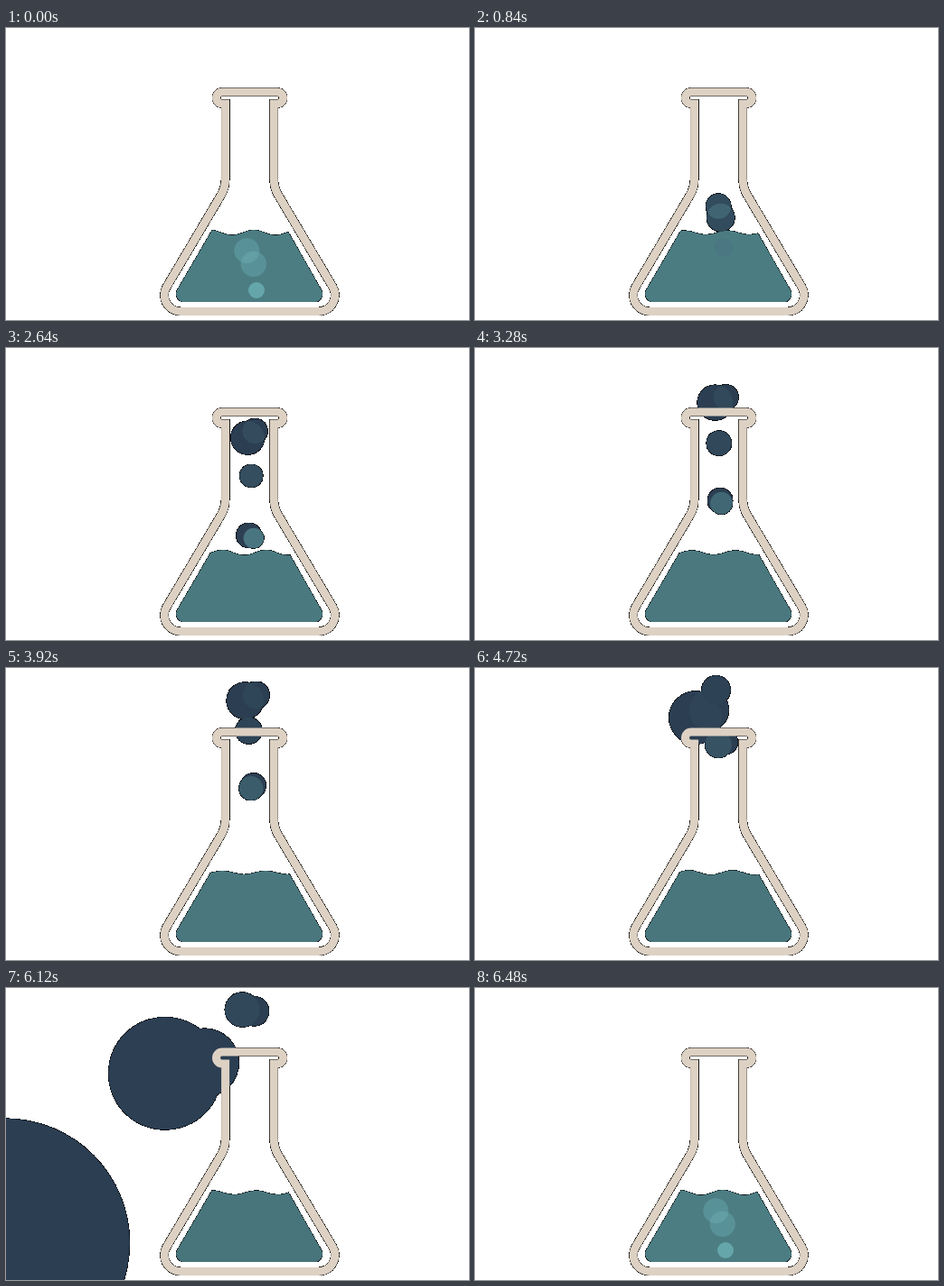
Animation, 512 px wide and 324 px high, one loop 6.52 s. Source, as an HTML page with a canvas:

```html
<!DOCTYPE html>
<html lang="en">
<head>
<meta charset="utf-8">
<title>Bubbling flask</title>
<style>
  html, body { margin: 0; width: 100%; height: 100%; overflow: hidden; background: #fff; }
  canvas { display: block; width: 512px; height: 324px; }
</style>
</head>
<body>
<canvas id="stage" width="512" height="324"></canvas>
<script>
const W = 512, H = 324, LOOP = 6520, RESET = 6480, STEP = 40;
const ctx = document.getElementById('stage').getContext('2d', { willReadFrequently: true });

const NAVY = [43, 62, 82], PALE = [100, 166, 170];
const TEAL = [76, 125, 131], TEAL_END = [72, 115, 122];

// Ways to drift off after leaving the neck: shift after one second, and its power.
const swell = { dx: -18.3, dy: 17, dr: 8.1, power: 3 };
const slide = { dx: -21, dy: 19.5, dr: 8.5, power: 1.2 };
const sweep = { dx: -52, dy: 43, dr: 26.6, power: 2 };

// Rates (rise, lean, grow) are pixels per second; times are milliseconds.
const lead = { born: -100, x: 274, y: 268, r: 14, rise: 61.4, lean: -2.5, grow: 1.7, turn: 3780, fade: 450, drift: swell };
const twin = { born: -100, x: 266, y: 253, r: 14, rise: 58.7, lean: 3.4, grow: 0, turn: 3840, fade: 450, drift: slide };
const third = { born: 0, x: 277, y: 291, r: 9, rise: 56.5, lean: -2.2, grow: 1.5, turn: 4800, fade: 1400, drift: sweep };
const fourth = { born: 1300, x: 277, y: 292, r: 9, rise: 60.5, lean: -2.3, grow: 1.7, turn: 4500, fade: 2100, drift: sweep };
const rear = { born: 1350, x: 263.5, y: 286, r: 14, rise: 60.5, lean: 3.9, grow: 0, turn: 4400, fade: 300, drift: slide };

const mix = (a, b, k) => a.map((v, i) => v + (b[i] - v) * k);
const rgb = c => `rgb(${c.map(Math.round)})`;

function disc(b, t) {
  const age = t - b.born;
  const up = Math.min(age, b.turn) / 1000;
  const off = Math.pow(Math.max(0, age - b.turn) / 1000, b.drift.power);
  ctx.beginPath();
  ctx.arc(b.x + b.lean * up + b.drift.dx * off,
    b.y - b.rise * up + b.drift.dy * off,
    b.r + b.grow * up + b.drift.dr * off, 0, Math.PI * 2);
}

function drawBubble(b, t) {
  if (t < b.born) return;
  disc(b, t);
  ctx.fillStyle = rgb(mix(NAVY, PALE, Math.exp((b.born - t) / b.fade)));
  ctx.fill();
}

function drawOverlap(a, b, t) {
  ctx.save();
  disc(a, t);
  ctx.clip();
  disc(b, t);
  ctx.fillStyle = `rgba(120,190,190,${.3 * Math.exp(-t / 2500)})`;
  ctx.fill();
  ctx.restore();
}

function drawLiquid(t) {
  const crest = 274 + 14 * Math.sin(Math.PI * t / RESET);
  const height = 2.4 + .5 * Math.cos(2 * Math.PI * t / 2640);
  const bottom = 304.1;
  ctx.save();
  ctx.beginPath();
  ctx.moveTo(269, bottom);
  ctx.arcTo(181.5, bottom, 231, 219, 9);
  ctx.lineTo(231, 219);
  ctx.lineTo(308, 219);
  ctx.arcTo(356.5, bottom, 269, bottom, 9);
  ctx.closePath();
  ctx.clip();
  ctx.beginPath();
  ctx.moveTo(180, 306);
  for (let x = 180; x <= 360; x += 2)
    ctx.lineTo(x, 227 - height * Math.cos((x - crest) * Math.PI / 24));
  ctx.lineTo(360, 306);
  ctx.fillStyle = rgb(mix(TEAL, TEAL_END, t / RESET));
  ctx.fill();
  ctx.restore();
}

const flask = new Path2D(
  'M242.6 84 V167 Q242.6 177 238 185 L177.6 287.2 A18.2 18.2 0 0 0 193.3 314.5' +
  ' H345.5 A18.2 18.2 0 0 0 361.3 287.2 L300.8 185 Q296.2 177 296.2 167 V84' +
  ' H300 A6.5 6.5 0 0 0 300 71 H239 A6.5 6.5 0 0 0 239 84 Z');

function drawFlask() {
  ctx.lineWidth = 9;
  ctx.strokeStyle = '#ddd1c3';
  ctx.stroke(flask);
}

// Soft edge pixels are blended with black, which gives the thin dark outline.
function hardenEdges() {
  const image = ctx.getImageData(0, 0, W, H), d = image.data;
  for (let i = 0; i < d.length; i += 4) {
    const alpha = d[i + 3];
    if (alpha === 0 || alpha === 255) continue;
    for (let c = i; c < i + 3; c++) d[c] *= alpha / 255;
    d[i + 3] = 255;
  }
  ctx.putImageData(image, 0, 0);
}

function draw(t) {
  ctx.clearRect(0, 0, W, H);
  drawBubble(rear, t);
  drawLiquid(t);
  drawBubble(lead, t);
  drawBubble(twin, t);
  drawOverlap(lead, twin, t);
  drawBubble(third, t);
  drawBubble(fourth, t);
  drawFlask();
  hardenEdges();
}

const start = performance.now();
function tick() {
  const t = Math.floor((performance.now() - start) % LOOP / STEP) * STEP;
  draw(t >= RESET ? 0 : t);
  requestAnimationFrame(tick);
}
tick();
</script>
</body>
</html>
```
